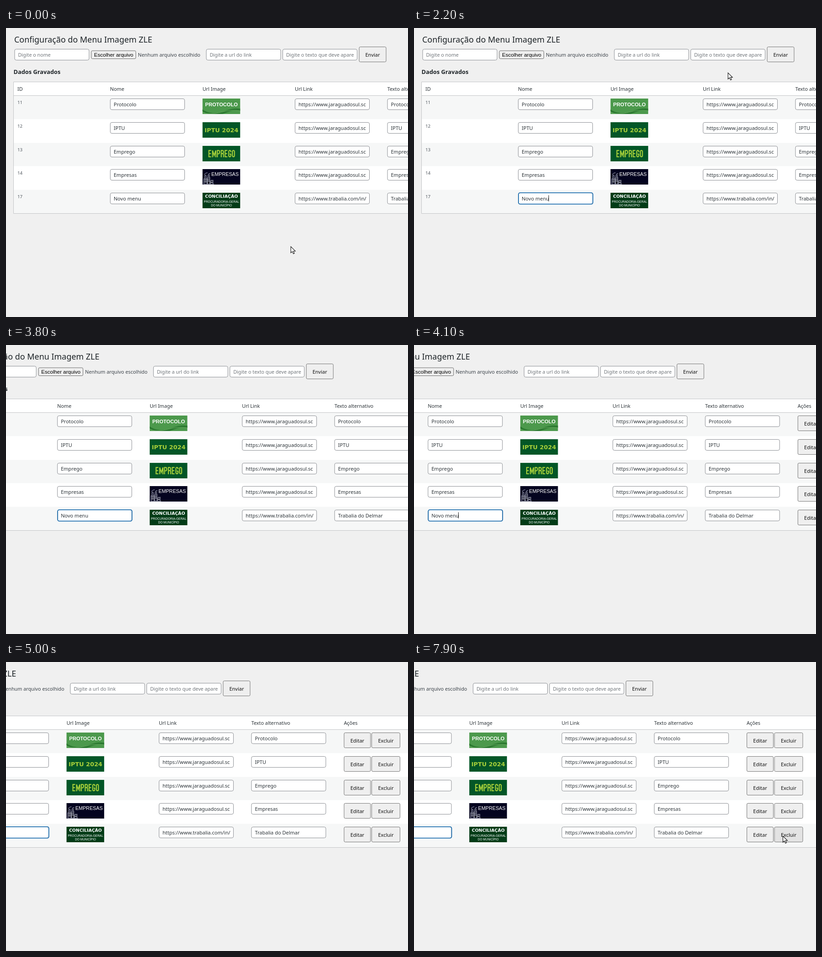
Write an HTML page that moves like this. It is 881x635 px and loops after 8 s.

```html
<!DOCTYPE html>
<html lang="pt-BR">
<head>
<meta charset="utf-8">
<style>
  html, body { margin: 0; width: 100%; height: 100%; overflow: hidden; background: #f0f0f0; }
  svg { display: block; width: 881px; height: 635px; }
  text { font-family: "Noto Sans", sans-serif; white-space: pre; }
  .arial { font-family: "Liberation Sans", Arial, sans-serif; }
  .wide { font-family: "DejaVu Sans", sans-serif; font-weight: bold; }
</style>
</head>
<body>
<svg viewBox="0 0 881 635">
  <g id="page"></g>
  <path id="arrow" d="M.5 .5V14.2L3.7 11.2 6 16.2 8.3 15.2 6.1 10.3H10.4Z" fill="#fff" stroke="#111" stroke-width="1.1"/>
  <g id="beam" fill="none">
    <path d="M-3.5-6.5H-1.5L0-5.5 1.5-6.5H3.5M0-5.5V5.5M-3.5 6.5H-1.5L0 5.5 1.5 6.5H3.5" stroke="#fff" stroke-width="3"/>
    <path d="M-3.5-6.5H-1.5L0-5.5 1.5-6.5H3.5M0-5.5V5.5M-3.5 6.5H-1.5L0 5.5 1.5 6.5H3.5" stroke="#111" stroke-width="1.3"/>
  </g>
</svg>
<script>
const LOOP = 8000;
const COLUMNS = [25, 228, 430.7, 633, 835.7, 1038.5];
const $ = id => document.getElementById(id);

const text = (x, y, label, size = 10.85, fill = '#2c3338', extra = '') =>
  `<text x="${x}" y="${y}" font-size="${size}" fill="${fill}" ${extra}>${label}</text>`;
const rect = (x, y, w, h, fill, extra = '') =>
  `<rect x="${x}" y="${y}" width="${w}" height="${h}" fill="${fill}" ${extra}/>`;
const line = (d, stroke, width = 1) =>
  `<path d="${d}" fill="none" stroke="${stroke}" stroke-width="${width}"/>`;
const input = (x, y, label, fill, size) =>
  rect(x + .5, y + .5, 163, 24, '#fff', 'rx="3.5" stroke="#8c8f94"') +
  text(x + 8, y + 16.5, label, size, fill);
const hint = (x, label) => input(x, 46, label, '#70757a', 10.75);
const button = (x, y, w, label, id = '') =>
  rect(x + .5, y + .5, w, 33, '#efefef', `rx="2.5" stroke="#767676" ${id && `id="${id}"`}`) +
  text(x + .5 + w / 2, y + 21.5, label, 11, '#111', 'text-anchor="middle"');
const label = (y, str, size, cls, fill = '#fff', x = 41.5) =>
  text(x, y, str, size, fill, `class="${cls}" text-anchor="middle"`);

// Banner pictures, 82.5 x 34
const banners = [
  rect(0, 0, 82.5, 34, '#4c994c') +
    '<path d="M0 24C18 36 34 32 52 26S74 22 82.5 22V27C66 24 54 30 44 34H14Q5 32 0 28Z" fill="#2c7a31"/>' +
    line('M0 31Q18 36 40 30T82 27', '#7ab86f', .8) +
    label(16.8, 'PROTOCOLO', 11.1, 'arial', '#fff" font-weight="bold'),
  rect(0, 0, 82.5, 34, '#035627') + label(21.5, 'IPTU 2024', 12.9, 'wide', '#a8d03a'),
  rect(0, 0, 82.5, 34, '#035627') +
    '<g transform="translate(14 10)" aria-label="EMPREGO">' +
    line('M5 0H0V14H5M0 7H4.5M8 15V0L11.5 11 15 0V15M18.5 15V0H21Q23.5 0 23.5 3.5T21 7.5H18.5' +
      'M27 15V0H29.5Q32 0 32 3.5T29.5 7H27M29.5 7Q32 7 32 10V15M40.5 0H35.5V14H40.5M35.5 7H40' +
      'M48 4V3Q48 0 45.7 0T43.5 3V11Q43.5 14 45.7 14T48 11V8H45.5' +
      'M51.5 3Q51.5 0 53.8 0T56 3V11Q56 14 53.8 14T51.5 11Z', '#a8d03a', 2.1) + '</g>',
  rect(0, 0, 82.5, 34, '#04041f') +
    line('M3 33V21H10V33M11 33V18H16V33M17 33V26L20 24V26L23 24V33M2 33H25' +
      'M5 21V14H8V21M5 13Q4 10 7 9T11 8M12 18V13H15V18M13 12Q13 9 17 10', '#dfe3ea', .8) +
    line('M4 24H9M4 28H9M12 22H15M12 26H15M18 29H22', '#dfe3ea', 1.4) +
    label(15, 'EMPRESAS', 10.8, 'arial', '#fff', 49.3),
  rect(0, 0, 82.5, 34, '#033c17') + label(11.3, 'CONCILIAÇÃO', 9.4, 'wide') +
    label(22, 'PROCURADORIA-GERAL', 6.5, 'arial') + label(30.3, 'DO MUNICÍPIO', 6.5, 'arial'),
];

const town = 'https://www.jaraguadosul.sc';
const rows = [
  [11, 'Protocolo', town, 'Protocolo'],
  [12, 'IPTU', town, 'IPTU'],
  [13, 'Emprego', town, 'Emprego'],
  [14, 'Empresas', town, 'Empresas'],
  [17, 'Novo menu', 'https://www.trabalia.com/in/', 'Trabalia do Delmar'],
];
const rowTop = i => Math.round(155 + 51.8 * i);

function buildRow([id, name, url, alt], i) {
  const y = rowTop(i);
  return rect(17, y - 6.5, 1300, 52, i % 2 ? '#fff' : '#f6f7f7') +
    text(25, y + 12, id, 9.8, '#50575e') +
    input(228, y, name, '#2c3338', 11) +
    `<g transform="translate(430.7 ${y})">${banners[i]}</g>` +
    input(633, y, url, '#2c3338', 11) +
    input(835.5, y, alt, '#2c3338', 11) +
    button(1038.5, y, 58, 'Editar', 'edit' + i) +
    button(1099, y, 62, 'Excluir', 'delete' + i);
}

$('page').innerHTML =
  text(18, 32, 'Configuração do Menu Imagem ZLE', 17.95, '#1d2327') +
  hint(18.5, 'Digite o nome') +
  rect(187, 50, 97.5, 17.5, '#efefef', 'rx="2.5" stroke="#6b6b6b"') +
  text(193, 62.5, 'Escolher arquivo', 11.55, '#000', 'class="arial"') +
  text(289, 62.5, 'Nenhum arquivo escolhido', 10.8, '#3c434a') +
  hint(438.5, 'Digite a url do link') +
  hint(606, 'Digite o texto que deve apare') +
  button(773.5, 41, 59, 'Enviar') +
  text(16.5, 101, 'Dados Gravados', 12.8, '#1d2327', 'font-weight="bold"') +
  rect(17, 119, 1300, 288, '#fff') +
  ['ID', 'Nome', 'Url Image', 'Url Link', 'Texto alternativo', 'Ações']
    .map((title, i) => text(COLUMNS[i], 137.5, title)).join('') +
  rows.map(buildRow).join('') +
  line('M1320 118.5H16.5V407.5H1320M17 148.5H1320', '#c3c4c7') +
  rect(229, 362.2, 163, 24.6, 'none', 'id="focus" rx="3.5" stroke="#2271b1" stroke-width="1.8"') +
  rect(294.6, 367.5, 1, 13.5, '#111', 'id="caret"');

// Keys: [time, value, ...]
const scrollKeys = [[3300, 0], [3400, 9], [3600, 50], [3800, 115.5], [4000, 173], [4200, 222],
  [4500, 266], [5000, 298], [5200, 309.5]];
const entering = [[0, 624, 480], [300, 540, 450], [600, 350, 395], [900, 243, 374],
  [1300, 312, 376], [1700, 241, 376], [1800, 241, 376], [1900, 350, 376], [2000, 350, 376],
  [2100, 490, 262], [2200, 686, 99], [2300, 853, 6]];
const returning = [[5600, 529, 172], [5800, 380, 255], [6100, 64, 379], [6200, 59, 380],
  [6400, 146, 382], [7300, 523, 381], [7700, 770, 382], [7900, 808, 382]];

function sample(keys, t) {
  const next = keys.findIndex(k => k[0] > t);
  if (next < 0) return keys[keys.length - 1].slice(1);
  if (!next) return keys[0].slice(1);
  const a = keys[next - 1], b = keys[next], u = (t - a[0]) / (b[0] - a[0]);
  return a.slice(1).map((v, i) => v + (b[i + 1] - v) * u);
}

const show = (el, on) => el.setAttribute('visibility', on ? 'visible' : 'hidden');

function draw(t) {
  const [scroll] = sample(scrollKeys, t);
  $('page').setAttribute('transform', `translate(${-scroll} 0)`);
  show($('focus'), t >= 1300);
  show($('caret'), t >= 1900 && t < 5600 && (t < 2100 || (t - 2100) % 1000 < 500));

  const visible = t < 2380 || t >= 5600;
  const [x, y] = sample(t < 5000 ? entering : returning, t);
  const px = x + scroll;
  const rowAt = visible ? rows.findIndex((_, i) => y >= rowTop(i) && y <= rowTop(i) + 34) : -1;
  const overInput = rowAt >= 0 && y <= rowTop(rowAt) + 25 &&
    [228, 633, 835.5].some(left => px >= left && px <= left + 164);
  for (const [el, cursor] of [[$('arrow'), !overInput], [$('beam'), overInput]]) {
    el.setAttribute('transform', `translate(${x} ${y})`);
    show(el, visible && cursor);
  }
  rows.forEach((_, i) => {
    const tint = over => rowAt === i && over ? '#e3e3e3' : '#efefef';
    $('edit' + i).setAttribute('fill', tint(px >= 1038 && px <= 1097));
    $('delete' + i).setAttribute('fill', tint(px >= 1099 && px <= 1162));
  });
}

const start = performance.now();
(function tick() {
  draw((performance.now() - start) % LOOP);
  requestAnimationFrame(tick);
})();
</script>
</body>
</html>
```
